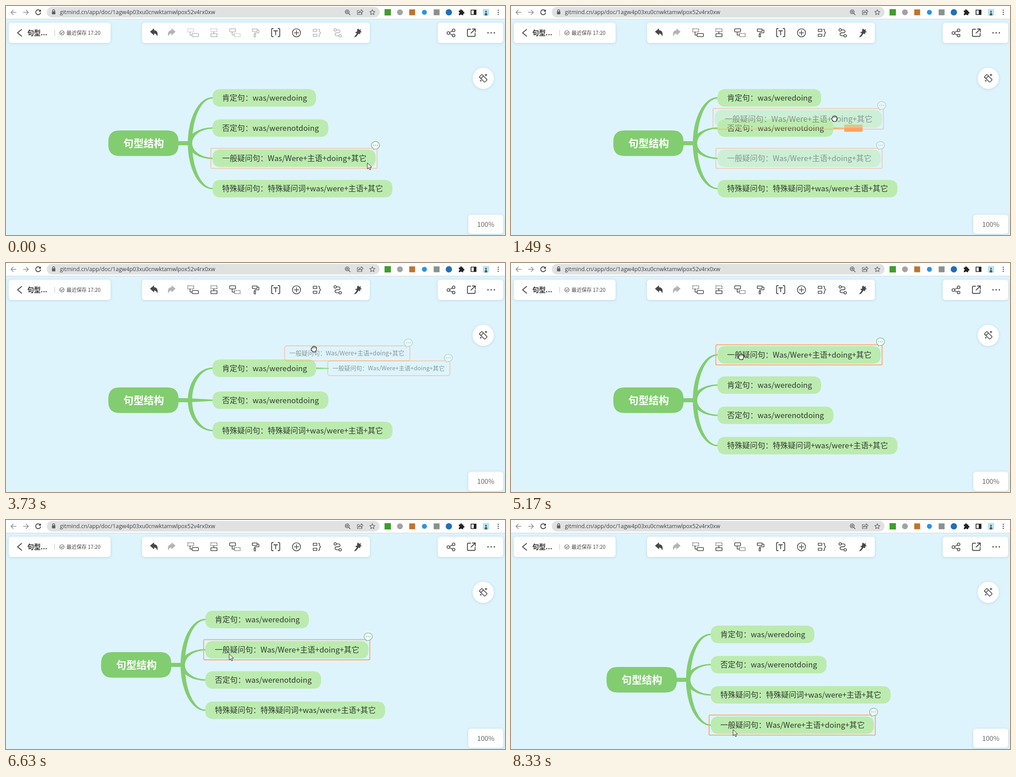
Animation, 1102 px wide and 508 px high, one loop 8530 ms. Source, as an HTML page:

```html
<!DOCTYPE html>
<html lang="zh-CN">
<head>
<meta charset="utf-8">
<title>句型结构</title>
<style>
html, body { margin: 0; width: 100%; height: 100%; overflow: hidden; background: #def4fd; }
svg { display: block; width: 1102px; height: 508px; font-family: "Noto Sans CJK SC", "Noto Sans CJK", "Noto Sans", sans-serif; }
.panel { fill: #fff; filter: drop-shadow(0 1px 3px rgba(70, 120, 150, .22)); }
.ln { fill: none; stroke: currentColor; stroke-width: 1.6; stroke-linejoin: round; stroke-linecap: round; }
.dash { stroke-dasharray: 2 1.6; stroke-linecap: butt; }
.fill { fill: currentColor; }
.node { font-weight: 350; fill: #2f3a2f; }
</style>
</head>
<body>
<svg viewBox="0 0 1102 508">
  <rect width="1102" height="508" fill="#def4fd"/>
  <g id="map"></g>

  <!-- browser bar -->
  <rect width="1102" height="29" fill="#fff"/>
  <rect y="28.5" width="1102" height="1" fill="#ccd6d6"/>
  <rect x="90" y="2" width="735" height="23.5" rx="11.7" fill="#e0e2e2"/>
  <g color="#8b8f92"><path class="ln" d="M22 14H11.500M16 9l-5 5 5 5M38.500 14H49M44.500 9l5 5-5 5"/></g>
  <g color="#333"><path class="ln" d="M75.500 10.500a5.500 5.500 0 1 0 1 4.500"/><path class="fill" d="M77 7.500v5h-5z"/></g>
  <g color="#5b5f63">
    <rect class="fill" x="101.500" y="12" width="7.500" height="6.500" rx="1"/>
    <path class="ln" stroke-width="1.300" d="M103 12v-1.500a2.200 2.200 0 0 1 4.400 0V12"/>
    <g style="--w:1"><circle class="ln" cx="753.500" cy="13" r="4.200"/><path class="ln" d="M756.700 16.200l3.300 3.300M751.800 13h3.400M753.500 11.300v3.400"/></g>
    <path class="ln" style="stroke-width:1.2" d="M780 10h-4v9h10v-3M778.500 16q.5-5 6-5V8l4 4.200-4 4.200v-2.600q-4 0-6 2.200z"/>
    <path class="ln" style="stroke-width:1.200" d="M809 8l1.700 3.900 4.200.4-3.200 2.800 1 4.100-3.700-2.200-3.700 2.200 1-4.100-3.200-2.800 4.200-.4z"/>
  </g>
  <text x="119" y="17.800" font-size="12.250" font-family="Open Sans, Noto Sans, sans-serif" fill="#3d4145">gitmind.cn/app/doc/1agw4p03xu0cnwktamwlpox52v4rx0xw</text>
  <rect x="836" y="7" width="14" height="14" fill="#3f9e2c"/>
  <circle cx="870" cy="14" r="6.500" fill="#a3a3a3"/>
  <rect x="890.500" y="7.500" width="13" height="13" fill="#c0722c"/>
  <circle cx="924" cy="14" r="5.500" fill="#2a93e8"/>
  <rect x="944.500" y="7.500" width="13" height="13" fill="#8b918d"/>
  <circle cx="978" cy="14" r="7" fill="#1f70b8"/>
  <path fill="#222" d="M1000 10h3a2 2 0 1 1 3.800 0h3v3.200a2 2 0 1 1 0 3.800v3.200h-3.200a1.900 1.900 0 0 0-3.600 0h-3v-3.200a1.900 1.900 0 0 0 0-3.800z"/>
  <path fill="none" stroke="#222" stroke-width="1.700" d="M1027 9h11v10h-11z"/><path fill="#222" d="M1033 9h5v10h-5z"/>
  <rect x="1053" y="6.500" width="14" height="14.500" fill="#b9e4ee"/>
  <path fill="#48606c" d="M1057 21q0-6 3-6t3 6z"/><circle cx="1060" cy="12.500" r="2" fill="#48606c"/>
  <path stroke="#444" stroke-width="2.600" stroke-linecap="round" d="M1087 9.500h0M1087 14h0M1087 18.500h0"/>

  <!-- panels -->
  <rect class="panel" x="6" y="37" width="225" height="45" rx="6"/>
  <rect class="panel" x="300.500" y="37" width="503" height="45" rx="6"/>
  <rect class="panel" x="953.500" y="37" width="144.500" height="45" rx="6"/>
  <rect class="panel" x="1021" y="463" width="77" height="42.500" rx="6"/>
  <circle class="panel" cx="1054" cy="160.500" r="23.500"/>
  <g color="#484848">
    <path class="ln" style="stroke-width:1.900" d="M34.500 52l-9 7.500 9 7.500"/>
    <path stroke="#c2c2c2" d="M107.500 53v13"/>
    <g style="color:#555"><circle class="ln" style="stroke-width:1.100" cx="123.500" cy="59.500" r="4.800"/><path class="ln" style="stroke-width:1.100" d="M121.200 59.500l1.800 1.800 3-3.200"/></g>
    <path class="fill" d="M318 57l9-7.500v4.300c6.500.3 9.500 6 7 14-1.300-4.500-3-6.500-7-6.500v4z"/>
    <path style="color:#b4b4b4" class="fill" d="M374.500 57l-9-7.500v4.300c-6.500.3-9.500 6-7 14 1.300-4.500 3-6.500 7-6.500v4z"/>
    <path class="ln" style="stroke-width:1.900" d="M590 50h-1.500q-2 0-2 2v14q0 2 2 2h1.500M601 50h1.500q2 0 2 2v14q0 2-2 2H601M591.500 55h8M595.500 55v9"/>
    <g><circle class="ln" cx="641.500" cy="59.500" r="9"/><path class="ln" d="M636.500 59.500h10M641.500 54.500v10"/></g>
    <path class="fill" d="M778 50l1.800 3 4.200-1.500-1.300 4 3.300 2.300-4 1.200.3 4-3.500-2-5.500 7-5 1.500 6.500-8.500-4-3 4.500-1 .2-5z"/>
    <g><circle class="ln" cx="977" cy="60" r="3"/><circle class="ln" cx="988.500" cy="54" r="3"/><circle class="ln" cx="988.500" cy="65.500" r="3"/><path class="ln" d="M979.800 58.600l6-3.100M979.800 61.400l6 2.800"/></g>
    <path class="ln" style="stroke-width:1.800" d="M1026 51.500h-5q-2 0-2 2v12q0 2 2 2h13q2 0 2-2v-5M1030 51h6.500v6.500M1036 51.500l-9 8.500"/>
    <path stroke="#484848" stroke-width="3.200" stroke-linecap="round" d="M1064.500 59.500h0M1071.500 59.500h0M1078.500 59.500h0"/>
    <g transform="translate(1054 160.500) rotate(45)"><rect class="ln" x="-8.500" y="-4" width="17" height="8" rx="1.500"/><path class="ln" d="M-3.500-4v8"/></g>
    <path class="fill" d="M1060 149.500l1 2.500 2.500 1-2.500 1-1 2.500-1-2.500-2.500-1 2.500-1zM1048.500 163l.8 2 2 .8-2 .8-.8 2-.8-2-2-.8 2-.8zM1046 156l.5 1.500 1.500.5-1.500.5-.5 1.500-.5-1.500-1.500-.5 1.500-.5z"/>
  </g>
  <g id="tools">
    <path class="ln" d="M412.500 61h11q1.500 0 1.500 1.500v4q0 1.500-1.500 1.500h-11q-1.500 0-1.500-1.500v-4q0-1.500 1.500-1.500zM406.500 58v6.500h4.500"/><path class="ln dash" d="M401.500 50.500h13v7h-13z"/>
    <path class="ln" d="M452.500 61.500h13.500v6.500h-13.500zM459 57v4.500"/><path class="ln dash" d="M452.500 50.500h13.500v6.500h-13.500z"/>
    <path class="ln" d="M495.500 50.500h10q1.500 0 1.500 1.500v4q0 1.500-1.500 1.500h-10q-1.500 0-1.500-1.500v-4q0-1.500 1.500-1.500zM499.500 58v6.500h4.500"/><path class="ln dash" d="M504.500 61h12.500v7h-12.500z"/>
    <path class="ln" d="M544 51h10.500v5.500H544zM554.500 53.500h4v6h-9v3M548 62.500h3v6h-3z"/>
    <path class="ln" d="M678.500 51.500h8v5h-8zM678.500 62.500h8v5h-8zM690 51.500q2.500 0 2.500 2.500v3l2.500 2.500-2.500 2.500v3q0 2.500-2.500 2.500"/>
    <circle class="ln" cx="727" cy="53" r="2.700"/><circle class="ln" cx="738" cy="66" r="2.700"/>
    <path class="ln" d="M729.700 53h4q4 0 4 3.200t-4 3.200h-3q-4 0-4 3.300t4 3.300h4.500"/>
  </g>
  <text x="47" y="64.500" font-size="14.800" font-weight="700" fill="#333">句型...</text>
  <text x="133.500" y="63.500" font-size="11.200" fill="#444">最近保存 17:20</text>
  <text x="1040.500" y="489.500" font-size="14.700" fill="#666">100%</text>
  <g id="cursor"></g>
</svg>
<script>
const LOOP = 8530, GREEN = '#82cd70', ORANGE = '#ffa260', CY = 304.4, PITCH = 67.1;
const $ = id => document.getElementById(id);

const items = {
  yes: ['肯定句：was/weredoing', 229],
  no: ['否定句：was/werenotdoing', 256],
  ask: ['一般疑问句：Was/Were+主语+doing+其它', 360.5],
  special: ['特殊疑问句：特殊疑问词+was/were+主语+其它', 397.5]
};

// layouts: end time, order of the rows, shift of the whole map
const layouts = [
  [2510, 'yes no ask special', 0, 0],
  [4420, 'yes no special', 0, 0],
  [6000, 'ask yes no special', 0, 0],
  [8330, 'yes ask no special', -16, 17],
  [LOOP, 'yes no special ask', -15, 50]
];

// drags: start, end, grab point
const drags = [
  [1210, 2510, 715.7, 337.5], [3520, 4420, 771.5, 224],
  [5240, 6000, 508, 208], [7440, 8330, 490, 297]
];

// drop markers: start, end, y, x of the parent's edge (none: the root)
const drops = [
  [1280, 1630, 271, 712], [1630, 2510, 203.7, 685],
  [3870, 4420, 200], [5520, 6000, CY], [7650, 7790, 371.5], [7790, 8330, 438.5]
];

const path = [
  [200, 798, 348], [550, 715, 346], [880, 715, 346], [950, 716, 338], [1210, 716, 325],
  [1490, 714, 250], [1760, 717, 200], [1910, 717, 200], [1980, 717, 217.500],
  [2510, 717, 220], [2580, 716.500, 220], [2850, 800, 246], [3180, 800, 246], [3320, 788, 230],
  [3450, 775, 226], [3730, 680, 191], [4150, 550, 173], [4420, 550, 174], [5100, 508, 206],
  [5170, 508, 208], [5240, 498, 226], [5730, 492, 292], [5999, 492, 292], [6000, 492, 295],
  [6270, 492, 295], [6630, 493, 297], [6860, 486, 292], [7110, 490, 295], [7430, 490, 296],
  [7440, 490, 306], [8000, 491, 465], [8329, 491, 465], [8330, 490.500, 465]
];

// pointer looks: end time, kind
const kinds = [
  [950, 'arrow'], [2510, 'hand'], [2650, 'resize'], [3480, 'arrow'], [4420, 'hand'],
  [5130, 'arrow'], [6000, 'hand'], [7440, 'arrow'], [8330, 'hand'], [LOOP, 'arrow']
];
const looks = {
  arrow: '<path fill="#fff" stroke="#222" d="M0 0v13.500l3.200-2.900 2.100 4.900 2.200-1-2.100-4.700h4.400z"/>',
  hand: '<path fill="#fff" stroke="#111" stroke-width="1.200" d="M-4-2.500q0-3 2.300-2.600 1.500-1.700 3.200-.2 2-.8 2.700 1 2.200.2 1.800 3.300 0 3-1.800 5.500v1.700h-6.400q-3.300-3.700-3.600-6 0-2 1.800-1.500z"/><path stroke="#111" d="M-1.300-4v2.500M1.300-4.300v2.500M3.900-3.500v2"/>',
  resize: '<path fill="#fff" stroke="#222" d="M-8.500 0l4.500-4.500v3h8v-3l4.500 4.500-4.500 4.500v-3h-8v3z"/>'
};

const until = (list, t) => list.find(e => t < e[0]);
const during = (list, t) => list.find(e => t >= e[0] && t < e[1]);

function pointer(t) {
  const i = path.findIndex(p => p[0] > t);
  if (i < 1) return path[i ? path.length - 1 : 0].slice(1);
  const [a, b] = [path[i - 1], path[i]], k = (t - a[0]) / (b[0] - a[0]);
  return [1, 2].map(n => a[n] + (b[n] - a[n]) * k);
}

const pill = (x, y, w, h, r, color) =>
  `<path fill="${color}" d="M${x + r} ${y}h${w - 2 * r}q${r} 0 ${r} ${r}v${h - 2 * r}q0 ${r} ${-r} ${r}h${2 * r - w}q${-r} 0 ${-r} ${-r}v${2 * r - h}q0 ${-r} ${r} ${-r}z"/>`;

const label = (x, y, size, s) =>
  `<text class="node" x="${x}" y="${y + size * .37}" font-size="${size}">${s}</text>`;

// tapered branch from the trunk to a row
function branch(y, color) {
  if (Math.abs(y - CY) < 5) return `<path fill="${color}" d="M402 ${CY - 4.5}L456 ${y - 1.5}v3L402 ${CY + 4.5}z"/>`;
  const s = Math.sign(y - CY), out = y + 1.5 * s, inn = y - 1.5 * s, cw = s < 0 ? 1 : 0;
  return `<path fill="${color}" d="M401.500 ${CY}A54.500 ${Math.abs(out - CY)} 0 0 ${cw} 456 ${out}V${inn}A45 ${Math.abs(inn - CY)} 0 0 ${1 - cw} 411 ${CY}z"/>`;
}
const trunk = color => `<rect x="380.500" y="${CY - 4.5}" width="30" height="9" fill="${color}"/>`;

function frame(x, y, w, h, r, alpha, tint) {
  const bx = x + w - 3.5, by = y - 6.8;
  return `<rect x="${x}" y="${y}" width="${w}" height="${h}" rx="${r}" fill="none" stroke="${ORANGE}" stroke-width="1.800" opacity="${alpha}"/>
    <path fill="#f1fbf8" stroke="${tint}" stroke-width="1.400" d="M${bx - 5} ${by + 7}a9 8.300 0 1 1 4 1.300l-3.500 1.500z"/>
    <path stroke="${tint}" stroke-width="2.200" stroke-linecap="round" d="M${bx - 4} ${by}h0M${bx} ${by}h0M${bx + 4} ${by}h0"/>`;
}

function item(key, y) {
  const [s, w] = items[key];
  return pill(456, y - 19.4, w, 38.8, 18, '#bcebaf') + label(477.3, y, 16.8, s);
}

function draw(t) {
  const [, order, ox, oy] = until(layouts, t), rows = order.split(' ');
  const nested = rows.length < 4;
  const rowY = i => nested ? [233.5, CY, 371.5][i] : CY + (i - 1.5) * PITCH;
  const [px, py] = pointer(t), drag = during(drags, t), drop = during(drops, t);
  const askY = nested ? 233.5 : rowY(rows.indexOf('ask'));
  const alpha = t < 880 ? .55 : 1, tint = t < 2510 ? '#9ba5a5' : '#90b89a';
  const chosen = nested
    ? label(721, askY, 13.05, items.ask[0]) + frame(710.5, askY - 16.3, 270, 32.6, 5, alpha, tint)
    : item('ask', askY) + frame(452.5, askY - 22.4, 367, 44.8, 2, alpha, tint);

  let out = trunk(GREEN) + rows.map((_, i) => branch(rowY(i), GREEN)).join('');
  if (nested) out += `<path fill="${GREEN}" d="M685 232l28 1v1.600l-28 .4z"/>`;
  out += pill(226, CY - 28.4, 155, 56.8, 25, GREEN);
  out += `<text x="259.300" y="${CY + 8.3}" font-size="22.400" font-weight="700" fill="#fff">句型结构</text>`;
  rows.forEach((key, i) => { if (key !== 'ask') out += item(key, rowY(i)); });
  out += `<g opacity="${drag ? .5 : 1}">${chosen}</g>`;

  if (drop) {
    const [, , y, edge] = drop, x = edge ? edge + 24 : 456;
    out += edge ? `<path fill="${ORANGE}" d="M${edge} ${y - 1.5}l25 .7v1.600l-25 .7z"/>` : trunk(ORANGE) + branch(y, ORANGE);
    out += `<rect x="${x}" y="${y - 8}" width="40.500" height="16" rx="2" fill="${ORANGE}"/>`;
  }
  if (drag) {
    const cx = nested ? 845 : 636;
    out += `<g opacity=".5" transform="translate(${cx + px - drag[2]} ${askY + py - drag[3]}) scale(1.025) translate(${-cx} ${-askY})">${chosen}</g>`;
  }
  $('map').innerHTML = `<g transform="translate(${ox} ${oy})">${out}</g>`;
  $('tools').style.color = t < 880 ? '#b4b4b4' : '#484848';
  $('cursor').innerHTML = looks[until(kinds, t)[1]];
  $('cursor').setAttribute('transform', `translate(${px} ${py})`);
}

function tick() {
  draw(performance.now() % LOOP);
  requestAnimationFrame(tick);
}
tick();
</script>
</body>
</html>
```
